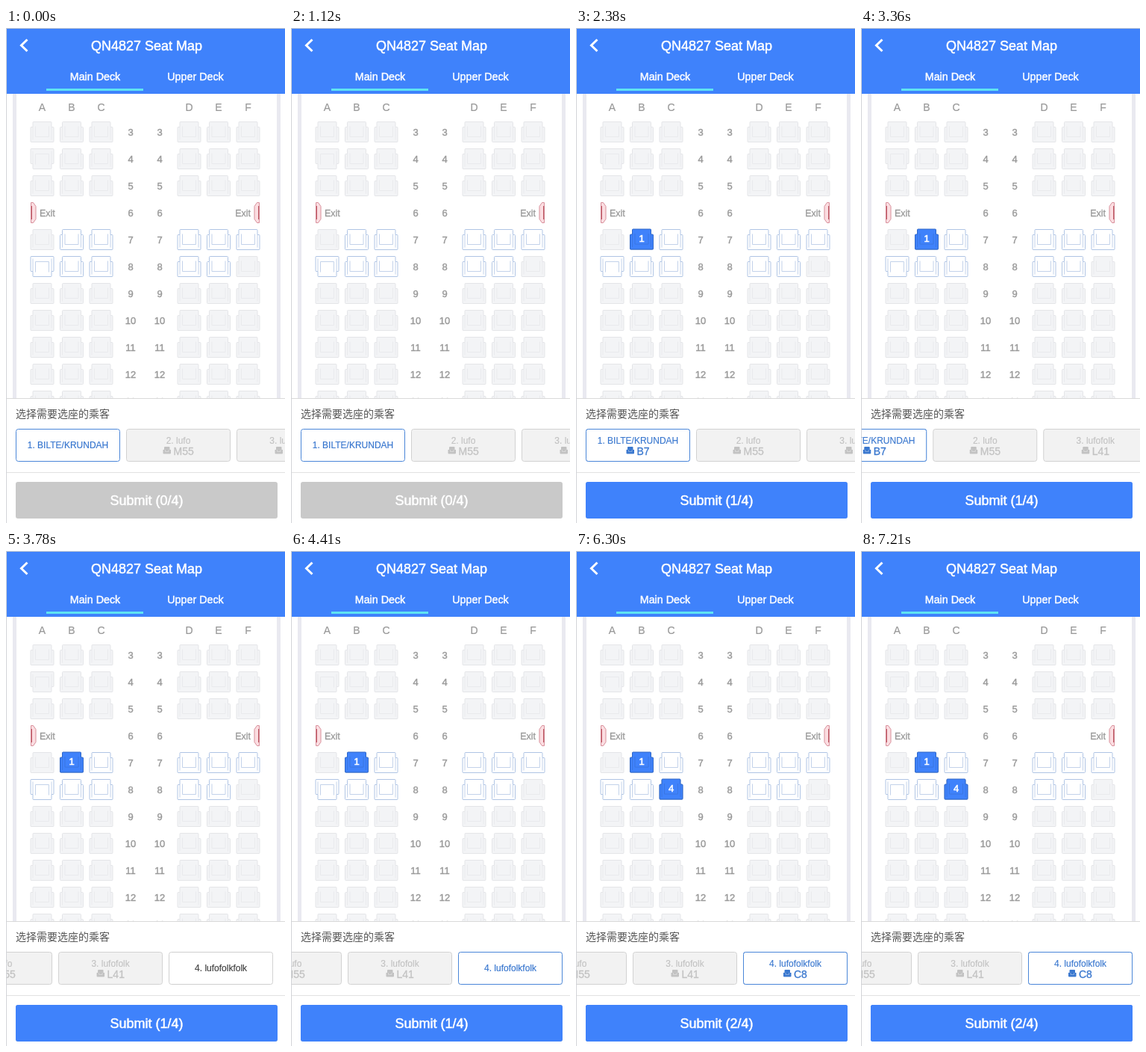
Recreate the animation shown at these times as an HTML page. Size 374 px wide and 662 px high, loop 7280 ms.

```html
<!DOCTYPE html>
<html lang="en">
<head>
<meta charset="utf-8">
<title>Seat map</title>
<style>
html, body { margin: 0; width: 100%; height: 100%; overflow: hidden; background: #fff; }
svg { display: block; width: 374px; height: 662px; }
text { font-family: "Liberation Sans", Arial, "Noto Sans CJK SC", "Noto Sans CJK", sans-serif; }

.first, .active, .second, .strip, .fly { animation: 7280ms linear infinite; }
.first, .active, .second { animation-timing-function: step-end; }
.first { animation-name: first; }
.active { animation-name: active; }
.second { animation-name: second; }
.strip { animation-name: strip; }
.fly { transform-box: fill-box; transform-origin: center; }
.fly.a { animation-name: flyA; }
.fly.b { animation-name: flyB; }

@keyframes first { 0% { opacity: 0; } 24.9%, 100% { opacity: 1; } }
@keyframes active { 0% { opacity: 0; } 57.6%, 100% { opacity: 1; } }
@keyframes second { 0% { opacity: 0; } 75.8%, 100% { opacity: 1; } }

@keyframes strip {
  0%, 42.6% { transform: translateX(0); animation-timing-function: ease-in; }
  46.15% { transform: translateX(-64px); }
  48.08% { transform: translateX(-146px); }
  50% { transform: translateX(-226px); }
  50.96% { transform: translateX(-243px); }
  51.92% { transform: translateX(-239px); animation-timing-function: ease-out; }
  53.85%, 100% { transform: translateX(-233px); }
}
@keyframes flyA {
  0% { opacity: 0; transform: translate(0, 0) rotate(0deg) scale(1); animation-timing-function: step-end; }
  24.79% { opacity: 1; transform: translate(0, 0) rotate(0deg) scale(1); animation-timing-function: ease-in-out; }
  31.66%, 100% { opacity: 0; transform: translate(259px, 353px) rotate(180deg) scale(0); }
}
@keyframes flyB {
  0% { opacity: 0; transform: translate(0, 0) rotate(0deg) scale(1); animation-timing-function: step-end; }
  75.62% { opacity: 1; transform: translate(0, 0) rotate(0deg) scale(1); animation-timing-function: ease-in-out; }
  82.49%, 100% { opacity: 0; transform: translate(237px, 272px) rotate(180deg) scale(0); }
}
</style>
</head>
<body>
<svg id="stage" viewBox="0 0 374 662"></svg>
<script>
const BLUE = '#3f82fb';
const COLS = { A: 48.5, B: 88, C: 127.5, D: 245.5, E: 285, F: 324.5 };
const FREE = { 7: 'BCDEF', 8: 'ABCDE' };
const FLIPPED = ['A4', 'A8'];
const rowY = row => 139 + (row - 3) * 36;

// Text centred vertically on y; bold is an outline width in px
const text = (x, y, size, color, str, bold = 0, anchor = 'middle') =>
  `<text x="${x}" y="${y + size * 0.36}" font-size="${size}" fill="${color}" stroke="${color}"
    stroke-width="${bold}" text-anchor="${anchor}">${str}</text>`;

const rect = (x, y, w, h, fill, more = '') =>
  `<rect x="${x}" y="${y}" width="${w}" height="${h}" fill="${fill}" ${more}/>`;

const group = (cls, body) => `<g class="${cls}">${body}</g>`;

function seat(x, y, fill, line, inner, flip) {
  return `<g transform="translate(${x} ${y}) scale(1 ${flip ? -1 : 1})" fill="${fill}" stroke="${line}">
    <path d="M-12.5 -6.5V-12.5q0-1 1-1H11.5q1 0 1 1V-6.5H14.5q1 0 1 1V12.5q0 1-1 1H-14.5q-1 0-1-1V-5.5q0-1 1-1Z"/>
    <path d="M-12.5 -6.5V10.5M12.5 -6.5V10.5" fill="none" stroke="${inner}"/>
    <path d="M-9 -7.5V6.5H9V-7.5" fill="none" stroke="${inner}"/></g>`;
}

function taken(col, row, n) {
  const x = COLS[col], y = rowY(row);
  return seat(x, y - 0.5, BLUE, '#2e66c6', '#3a76e2') + text(x, y - 2, 13, '#fff', n, 0.6);
}

function exit(x, dir) {
  return `<g transform="translate(${x} 247) scale(${dir} 1)">
    <path d="M0 -13.5H3L6.5 -8.5V8.5L3 13.5H0Z" fill="#fbdde1" stroke="#d88f9a"/>
    <path d="M.8 -9V9" stroke="#b8505c" stroke-width="1.2"/></g>`;
}

function seatMap() {
  let out = rect(9, 88, 5, 408, '#e9e9f0') + rect(363, 88, 5, 408, '#e9e9f0');
  for (const col in COLS) out += text(COLS[col], 106, 14, '#999', col, 0.2);
  for (let row = 3; row <= 13; row++) {
    const y = rowY(row);
    for (const x of [167, 206]) out += text(x, y, 13, '#999', row, 0.4);
    if (row === 6) continue;
    for (const col in COLS) {
      const flip = FLIPPED.includes(col + row);
      out += (FREE[row] || '').includes(col)
        ? seat(COLS[col], y, '#fff', '#afc4e4', '#c3d2ea', flip)
        : seat(COLS[col], y, '#f3f4f6', '#e4e5e8', '#e9eaed', flip);
    }
  }
  out += exit(33.5, 1) + exit(339.5, -1);
  out += text(45, 247, 12.5, '#999', 'Exit', 0.3, 'start') + text(328, 247, 12.5, '#999', 'Exit', 0.3, 'end');
  return out + group('first', taken('B', 7, 1)) + group('second', taken('C', 8, 4));
}

function miniSeat(x, y, color) {
  return `<path d="M${x + 1.5} ${y - 1}V${y - 4}q0-1 1-1H${x + 8}q1 0 1 1V${y - 1}H${x + 10.5}V${y + 3.5}q0 1-1 1H${x + 1}q-1 0-1-1V${y - 1}Z"
    fill="${color}"/><path d="M${x + 3} ${y - 1}V${y + 1.5}H${x + 7.5}V${y - 1}" fill="none" stroke="#fff" stroke-opacity=".35"/>`;
}

function card(i, name, style, code, codeWidth) {
  const [fill, line, color] = style;
  const x = 13 + i * 148, mid = x + 70;
  const box = rect(x + 0.5, 536.5, 139, 43, fill, `rx="3" stroke="${line}"`);
  const label = `${i + 1}. ${name}`;
  if (!code) return box + text(mid, 558, 12, color, label, 0.2);
  const left = mid - (codeWidth + 14) / 2;
  return box + text(mid, 552, 12, color, label, 0.15) + miniSeat(left, 565, color) +
    text(left + 14, 565.5, 14, color, code, 0.3, 'start');
}

function cards() {
  const on = ['#fff', '#4a86d8', '#3a78cf'];
  const off = ['#f2f2f2', '#d2d2d2', '#c2c2c2'];
  const idle = ['#fff', '#cfcfcf', '#444'];
  const one = 'BILTE/KRUNDAH', four = 'lufofolkfolk';
  return card(0, one, on) +
    group('first', card(0, one, on, 'B7', 17)) +
    card(1, 'lufo', off, 'M55', 27) +
    card(2, 'lufofolk', off, 'L41', 23) +
    card(3, four, idle) +
    group('active', card(3, four, on)) +
    group('second', card(3, four, on, 'C8', 18));
}

const submit = (n, fill) =>
  rect(13, 607, 351, 49, fill, 'rx="3"') + text(188.5, 632, 18, '#fff', `Submit (${n}/4)`, 0.5);

const flyer = (cls, col, row) =>
  rect(COLS[col] - 15.5, rowY(row) - 14, 31, 27, BLUE, `rx="2" class="fly ${cls}"`);

const header = rect(0, 0, 374, 88, BLUE) +
  '<path d="M28.5 15.5L20.5 23.2L28.5 31" fill="none" stroke="#fff" stroke-width="3"/>' +
  text(188.5, 23.5, 18, '#fff', 'QN4827 Seat Map', 0.5) +
  text(119.5, 65, 14.3, '#fff', 'Main Deck', 0.45) +
  text(254, 65, 14.3, '#fff', 'Upper Deck', 0.45) +
  rect(54, 81, 130, 3, '#5fe3f2');

const panel = rect(0, 495, 374, 167, '#fff') + rect(0, 495, 374, 1, '#d9d9d9') +
  text(13, 516, 14, '#555', '选择需要选座的乘客', 0, 'start') +
  group('strip', cards()) +
  rect(0, 594, 374, 1, '#e2e2e2') +
  submit(0, '#c9c9c9') + group('first', submit(1, BLUE)) + group('second', submit(2, BLUE));

document.getElementById('stage').innerHTML =
  rect(0, 0, 374, 662, '#fff') + seatMap() + header + panel +
  flyer('a', 'B', 7) + flyer('b', 'C', 8) +
  rect(0, 0, 1, 662, '#d3d5d9') + rect(0, 0, 374, 1, '#c4c9d2');
</script>
</body>
</html>
```
